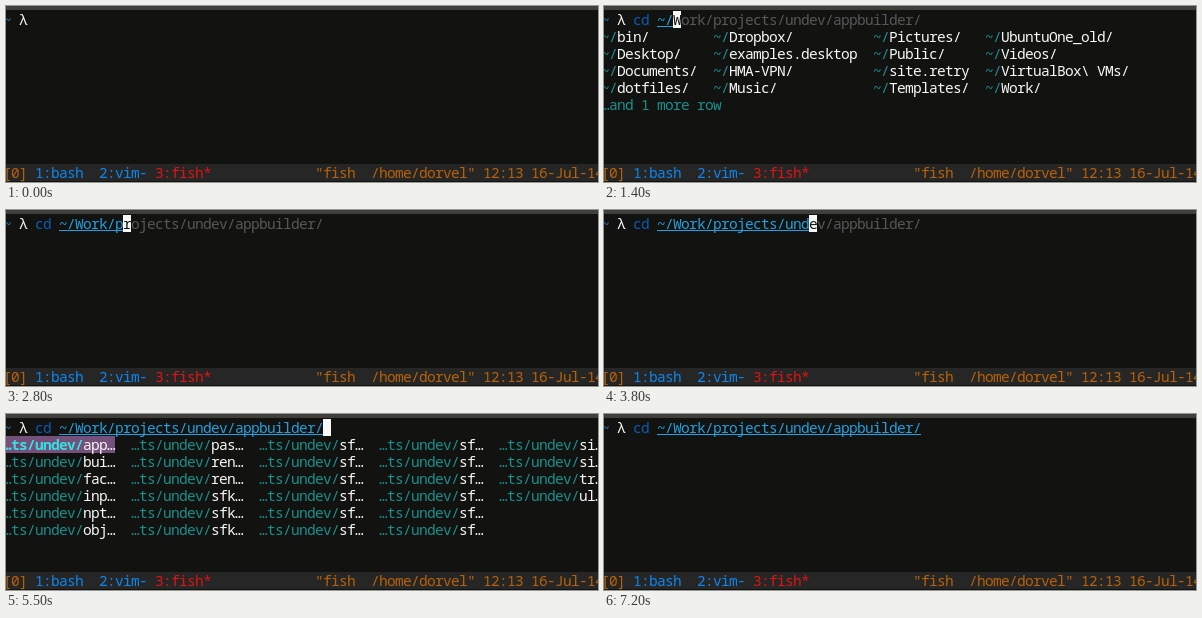
Write an HTML page with a canvas that moves like this. It is 592 px wide and 176 px high and loops after 7300 ms.

```html
<!DOCTYPE html>
<html lang="en">
<head>
<meta charset="utf-8">
<title>Shell completion</title>
<style>
  html, body { margin: 0; width: 100%; height: 100%; overflow: hidden; background: #121210; }
  canvas { display: block; }
</style>
</head>
<body>
<canvas id="stage" width="592" height="176"></canvas>
<script>
const ctx = document.getElementById('stage').getContext('2d');
const LOOP = 7300, BLINK = 500;
const CELL = 8, ROW = 17, LEFT = -3, TOP = 5;
const FONT = '14.5px "Noto Sans Mono", "DejaVu Sans Mono", monospace';
const TRACKING = '-0.7px';
const COLOR = {
  back: '#121210', edge: '#403f3b', bar: '#262626', white: '#f8f8f6',
  prompt: '#2f78b0', command: '#0a5cb8', path: '#22a0e0', hint: '#585858',
  teal: '#1b908c', bright: '#34e2e2', select: '#75507b',
  orange: '#b86208', blue: '#0d87f0', red: '#e01414'
};

const COMMAND = 'cd ~/Work/projects/undev/appbuilder/';
const PROMPT_COL = 4;
const upTo = part => COMMAND.indexOf(part) + part.length;

const HOME = [
  ['bin/', 'Desktop/', 'Documents/', 'dotfiles/'],
  ['Dropbox/', 'examples.desktop', 'HMA-VPN/', 'Music/'],
  ['Pictures/', 'Public/', 'site.retry', 'Templates/'],
  ['UbuntuOne_old/', 'Videos/', 'VirtualBox\\ VMs/', 'Work/']
];
const PROJECTS = [
  ['appbuilder/', 'builderexample/', 'face_rails_engine/', 'inpicture-sfk-apps/'],
  ['sfk-data/', 'sfk-em_mri/', 'sfk-homescreen2/', 'sfk-http/']
];
const SHORT = [
  ['app…', 'bui…', 'fac…', 'inp…', 'npt…', 'obj…'],
  ['pas…', 'ren…', 'ren…', 'sfk…', 'sfk…', 'sfk…'],
  Array(6).fill('sf…'),
  Array(6).fill('sf…'),
  ['si…', 'si…', 'tr…', 'ul…']
];
const FOUND = [['appbuilder/'], ['builderexample/']];
const DEEP = '…ts/undev/';

const homePager = { prefix: '~/', columns: HOME, starts: [0, 14, 34, 48], more: '…and 1 more row' };
const projectPager = { prefix: DEEP, columns: PROJECTS, starts: [0, 34], more: '…and 10 more rows' };
const fullPager = { prefix: DEEP, columns: SHORT, starts: [0, 16, 32, 47, 62] };
const chosenPager = { ...fullPager, selected: true };
const foundPager = { prefix: DEEP, columns: FOUND, starts: [0, 23], selected: true };

// Each key press: time, typed length, and what it leaves on screen.
const KEYS = [
  { at: 0, typed: 0, idle: true },
  { at: 500, typed: 1, hint: true },
  { at: 600, typed: 2, hint: true },
  { at: 700, typed: 3, hint: true },
  { at: 900, typed: 4, hint: true },
  { at: 1100, typed: 5, hint: true },
  { at: 1300, typed: 5, hint: true, pager: homePager },
  { at: 1700, typed: 5, hint: true, pager: homePager },
  { at: 2000, typed: upTo('W'), hint: true },
  { at: 2100, typed: upTo('Wo'), hint: true },
  { at: 2200, typed: upTo('Wor'), hint: true },
  { at: 2300, typed: upTo('Work'), hint: true },
  { at: 2500, typed: upTo('Work/'), hint: true },
  { at: 2700, typed: upTo('Work/p'), hint: true },
  { at: 2900, typed: upTo('Work/pr'), hint: true },
  { at: 3000, typed: upTo('Work/pro'), hint: true },
  { at: 3300, typed: upTo('projects/'), hint: true },
  { at: 3500, typed: upTo('/u'), hint: true },
  { at: 3600, typed: upTo('/un'), hint: true },
  { at: 3700, typed: upTo('/und'), hint: true },
  { at: 3900, typed: upTo('undev/') },
  { at: 4100, typed: upTo('undev/'), pager: projectPager },
  { at: 4800, typed: upTo('undev/'), pager: fullPager },
  { at: 5100, typed: COMMAND.length, pager: chosenPager },
  { at: 5600, typed: COMMAND.length, pager: chosenPager, search: '' },
  { at: 5700, typed: COMMAND.length, pager: foundPager, search: 'b' },
  { at: 5900, typed: COMMAND.length, pager: foundPager, search: 'bu' },
  { at: 6500, typed: COMMAND.length }
];

const xOf = col => LEFT + col * CELL;
const yOf = row => TOP + row * ROW;

function fillCells(col, row, count, color) {
  ctx.fillStyle = color;
  ctx.fillRect(xOf(col), yOf(row), count * CELL, ROW);
}

function write(text, col, row, color, bold = false) {
  ctx.font = (bold ? 'bold ' : '') + FONT;
  ctx.letterSpacing = TRACKING;
  ctx.fillStyle = color;
  ctx.fillText(text, xOf(col), yOf(row) + 14);
}

function underline(col, row, count, color) {
  ctx.fillStyle = color;
  ctx.fillRect(xOf(col), yOf(row) + 15, count * CELL, 1);
}

function drawCursor(col, row, char = '') {
  fillCells(col, row, 1, COLOR.white);
  write(char, col, row, COLOR.back);
}

function drawCommand({ typed, hint }) {
  write('~', 0, 0, COLOR.prompt);
  write('λ', 2, 0, COLOR.white);
  write(COMMAND.slice(0, Math.min(typed, 2)), PROMPT_COL, 0, COLOR.command);
  if (typed > 3) {
    write(COMMAND.slice(3, typed), PROMPT_COL + 3, 0, COLOR.path);
    underline(PROMPT_COL + 3, 0, typed - 3, COLOR.path);
  }
  if (hint) write(COMMAND.slice(typed), PROMPT_COL + typed, 0, COLOR.hint);
}

function drawPager({ prefix, columns, starts, more, selected }, top) {
  columns.forEach((names, c) => names.forEach((name, r) => {
    const col = starts[c], row = top + r;
    const active = selected && c === 0 && r === 0;
    if (active) fillCells(col, row, prefix.length + name.length, COLOR.select);
    write(prefix, col, row, active ? COLOR.bright : COLOR.teal, active);
    write(name, col + prefix.length, row, COLOR.white);
  }));
  if (more) write(more, 0, top + columns[0].length, COLOR.teal);
}

function drawSearch(text) {
  write('search: ' + text, 0, 1, COLOR.white);
  underline(8, 1, 12, COLOR.white);
}

function drawStatus() {
  ctx.fillStyle = COLOR.bar;
  ctx.fillRect(0, yOf(9), 592, ROW);
  write('[0]', 0, 9, COLOR.orange);
  write('1:bash', 4, 9, COLOR.blue);
  write('2:vim-', 12, 9, COLOR.blue);
  write('3:fish*', 19, 9, COLOR.red);
  write('"fish  /home/dorvel" 12:13 16-Jul-14', 39, 9, COLOR.orange);
}

function draw(time) {
  const key = KEYS.findLast(k => k.at <= time);
  const searching = key.search !== undefined;
  const cursorOn = !key.idle && Math.floor((time - key.at) / BLINK) % 2 === 0;

  ctx.fillStyle = COLOR.back;
  ctx.fillRect(0, 0, 592, 176);
  ctx.fillStyle = COLOR.edge;
  ctx.fillRect(0, 0, 592, 4);

  drawCommand(key);
  if (searching) drawSearch(key.search);
  if (key.pager) drawPager(key.pager, searching ? 2 : 1);
  if (cursorOn) {
    if (searching) drawCursor(8 + key.search.length, 1);
    else drawCursor(PROMPT_COL + key.typed, 0, key.hint ? COMMAND[key.typed] : '');
  }
  drawStatus();
}

const start = performance.now();
function tick() {
  draw((performance.now() - start) % LOOP);
  requestAnimationFrame(tick);
}
tick();
</script>
</body>
</html>
```
